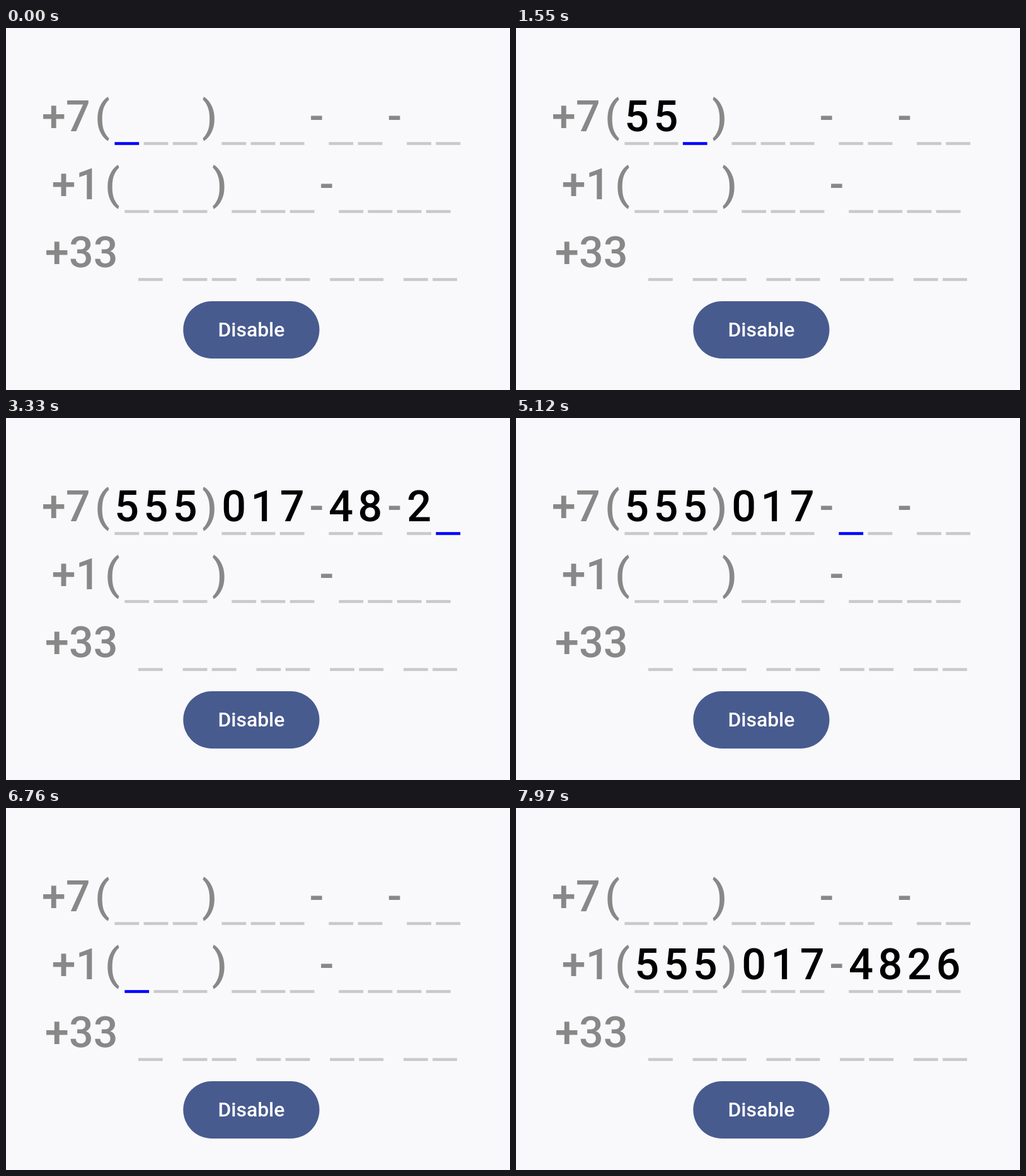
An HTML page that plays this animation: 800x575 px, repeating every 8090 ms.

```html
<!DOCTYPE html>
<html lang="en">
<head>
<meta charset="utf-8">
<title>Phone fields</title>
<style>
  html, body { margin: 0; width: 100%; height: 100%; overflow: hidden; background: #f9f9fb; }
  svg { display: block; }
  text { font: 500 68.4px Roboto, sans-serif; fill: #888; }
  .mid { text-anchor: middle; }
  .digit { fill: #000; }
  .label { font-size: 31.9px; fill: #fff; }
</style>
</head>
<body>
<svg id="stage" width="800" height="575" viewBox="0 0 800 575"></svg>
<script>
const LOOP = 8090, GAP = 7.4, SLOT = 38.8, MARK = 24, SPACE = 17;
const DIGITS = "5550174826";
const stage = document.getElementById("stage");

const clamp = value => Math.max(0, Math.min(1, value));

// Whole steps done at time t, spread from start to end
const steps = (t, start, end, count, power) =>
  Math.floor(count * clamp((t - start) / (end - start)) ** power);

function add(tag, attrs, content = "") {
  const node = document.createElementNS("http://www.w3.org/2000/svg", tag);
  for (const key in attrs) node.setAttribute(key, attrs[key]);
  node.textContent = content;
  return stage.appendChild(node);
}

function buildRow(prefix, prefixX, x, mask, baseline) {
  add("text", { x: prefixX, y: baseline }, prefix);
  const slots = [];
  for (const char of mask) {
    const width = char === "#" ? SLOT : char === " " ? SPACE : MARK;
    const label = { x: x + width / 2, y: baseline };
    if (char === "#") {
      slots.push({
        line: add("rect", { x, y: baseline + 17.2, width, height: 4.6 }),
        digit: add("text", { ...label, class: "mid digit" }, DIGITS[slots.length])
      });
    } else {
      add("text", { ...label, class: "mid" }, char);
    }
    x += width + GAP;
  }
  return slots;
}

const rows = [
  buildRow("+7", 56.7, 141, "(###)###-##-##", 164),
  buildRow("+1", 72.5, 156.9, "(###)###-####", 272),
  buildRow("+33", 61.8, 210, "# ## ## ## ##", 380)
];
add("rect", { x: 281.3, y: 434, width: 216.2, height: 91, rx: 45.5, fill: "#485b8f" });
add("text", { x: 389.4, y: 490, class: "mid label" }, "Disable");
const touch = add("circle", { r: 20.5, fill: "#f1f1f2", stroke: "#e4e7ee", "stroke-width": 2 });

function draw(now) {
  const t = now % LOOP;

  // Typed key by key, one key erased, then backspace held down at growing speed
  const typed = (t >= 1300) + steps(t, 1300, 3210, 8, .8);
  const erased = (t >= 4390) + (t >= 4880) + steps(t, 4880, 5580, 7, 1.66);
  const pasted = t >= 7120 ? DIGITS.length : 0;
  const counts = [typed - erased, pasted, 0];
  const focus = t < 6420 ? 0 : 1;

  rows.forEach((slots, row) => slots.forEach(({ line, digit }, i) => {
    line.setAttribute("fill", row === focus && i === counts[row] ? "#00f" : "#c9c9cb");
    digit.setAttribute("visibility", i < counts[row] ? "visible" : "hidden");
  }));

  const [x, y, start] = t < 3000 ? [269.5, 149, 720] : [257, 278, 6300];
  touch.setAttribute("cx", x);
  touch.setAttribute("cy", y);
  touch.setAttribute("opacity", clamp(Math.min((t - start) / 100, (start + 460 - t) / 220)));
  requestAnimationFrame(draw);
}
draw(0);
</script>
</body>
</html>
```
